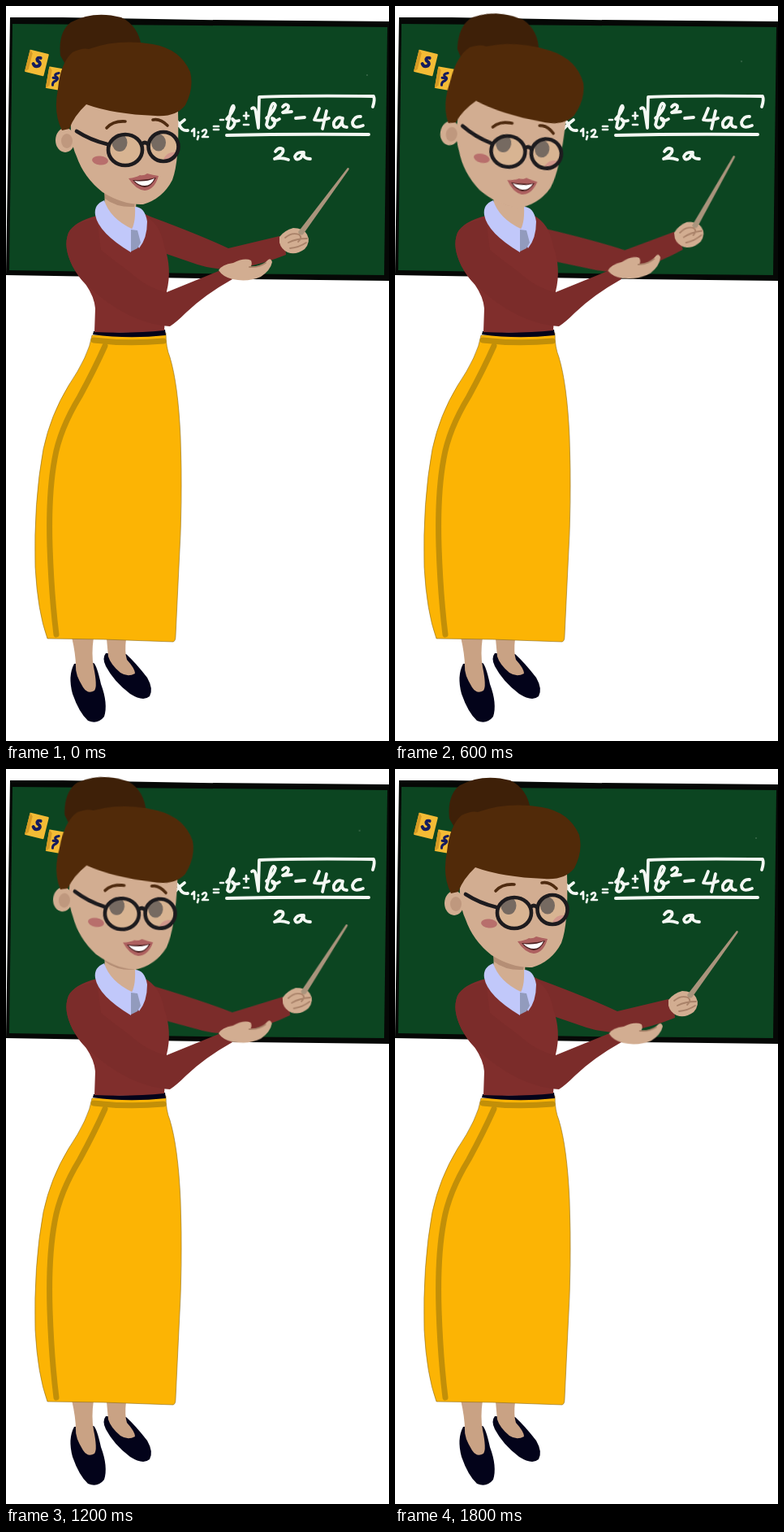
These frames come from a looping animation (472x904 px, 2 s). An HTML page:

```html
<!DOCTYPE html>
<html lang="en">
<head>
<meta charset="utf-8">
<title>Teacher at the board</title>
<style>
  html, body { margin: 0; width: 100%; height: 100%; overflow: hidden; background: #fff; }
  svg { display: block; width: 100%; height: 100%; }

  .skin { fill: #d2ad91; }
  .shade { fill: #b58e75; }
  .leg { fill: #c9a284; }
  .navy { fill: #03031a; }
  .sleeve { fill: #7b2c2a; }
  .hair { fill: #512a09; }
  .collar { fill: #c1c8fa; }
  .line { fill: none; stroke-linecap: round; stroke-linejoin: round; }
  .chalk { stroke: #f4f8f3; stroke-width: 3.8; }
  .small { stroke-width: 2.7; }
  .rim { stroke: #1d1b1e; stroke-width: 4.6; }
  .crease { stroke: #a98269; stroke-width: 1.8; }

  #head, #arm, #hand { animation: 2s step-end infinite; }
  #head { transform-origin: 130px 125px; animation-name: nod; }
  #arm { transform-origin: 298px 224px; animation-name: point; }
  #hand { transform-origin: 268px 326px; animation-name: wave; }

  @keyframes nod {
    0%, 90%, 100% { transform: rotate(0deg); }
    20%, 40%, 60%, 80% { transform: rotate(4.5deg); }
    30%, 70% { transform: rotate(8.2deg); }
    50% { transform: rotate(1.2deg); }
  }
  @keyframes point {
    0%, 90%, 100% { transform: rotate(0deg); }
    20%, 40%, 60%, 80% { transform: rotate(-3.7deg); }
    30%, 70% { transform: rotate(-7deg); }
    50% { transform: rotate(2.4deg); }
  }
  @keyframes wave {
    0%, 100% { transform: none; }
    10%, 90% { transform: translate(1.7px, .5px) rotate(1.1deg); }
    20%, 40%, 60%, 80% { transform: rotate(-1.8deg); }
    30%, 70% { transform: translate(.5px, 0) rotate(-5.5deg); }
    50% { transform: translate(5px, 1.5px) rotate(3.6deg); }
  }
</style>
</head>
<body>
<svg viewBox="0 0 472 904" preserveAspectRatio="none">
  <g id="board">
    <path fill="#060806" d="M5 14L70 14 240 17 472 19V338L300 336 0 331Z"/>
    <path fill="#0c4521" d="M8 22L240 24 470 26 466 331 240 329 4 325Z"/>
  </g>

  <g id="notes">
    <g transform="rotate(14 38 70)">
      <rect x="26" y="56" width="24" height="28" rx="1" fill="#f4bb35"/>
      <path fill="#d69a24" d="M26 56l4 4v20l-4 4Z"/>
      <path class="line" stroke="#141b5e" stroke-width="4" d="M41 63q-5 0-3 4 6 2 3 6-4 3-7-1"/>
    </g>
    <g transform="rotate(10 62 89)">
      <rect x="51" y="76" width="24" height="27" rx="1" fill="#f4bb35"/>
      <path fill="#d69a24" d="M51 76l4 4v19l-4 4Z"/>
      <path class="line" stroke="#141b5e" stroke-width="3" d="M64 82q-6 2-3 5 5 1 1 5-4 2-3 6m-1-9h3"/>
    </g>
  </g>

  <g id="formula" class="line chalk" role="img" aria-label="x 1;2 = (-b ± √(b² − 4ac)) / 2a">
    <path d="M206 140Q211 140 214 147 217 154 224 153M220 140Q213 145 206 153"/>
    <g class="small">
      <path d="M229 154L232 151V160M237 155V156M237 160L236 164M242 154Q246 150 247 154 247 157 242 161L249 161"/>
      <path d="M256 148H262M256 152H262"/>
      <path d="M264 140H268M293 135H299M296 131V139M293 146H299"/>
    </g>
    <path d="M272 139Q280 130 281 125 280 119 277 129L273 149Q276 153 280 148 284 142 279 139 280 143 287 141"/>
    <path d="M303 126Q307 123 308 131L311 150 312 112Q360 110 453 111 455 115 452 124"/>
    <path d="M321 138Q331 129 332 122 329 116 326 126L321 146Q324 153 330 147 334 139 328 138 329 144 337 139"/>
    <path d="M341 124Q345 119 348 123 349 127 341 131L352 130"/>
    <path d="M357 138L368 137"/>
    <path d="M386 126Q383 134 380 140 389 142 398 138M395 129Q392 142 390 151"/>
    <path d="M414 138Q408 135 404 143 403 151 409 149 414 145 415 138 412 149 420 149"/>
    <path d="M437 136Q430 135 427 143 427 152 440 147"/>
    <path stroke-width="4" d="M272 159Q350 157 447 158"/>
    <path d="M332 179Q336 173 341 176 344 181 331 188 340 186 348 189"/>
    <path d="M366 180Q359 179 356 185 357 191 363 187L367 180Q365 188 375 188"/>
  </g>

  <g id="arm">
    <circle cx="445" cy="85" r=".7" fill="#6d8f74"/>
    <path class="sleeve" d="M150 246L178 259Q240 282 274 298L337 283Q345 291 345 306 318 317 286 323 262 326 236 318L160 292Z"/>
    <path class="skin" d="M337 284Q343 276 354 273 366 273 371 281 376 290 368 299 357 307 347 303 339 299 337 291Z"/>
    <path fill="#aa947c" d="M360 278L421 199Q424 199 422 202L366 281Q362 283 360 278Z"/>
    <path class="line crease" d="M344 285Q352 278 361 281 366 285 360 290M348 291Q358 286 371 286M350 298Q361 297 370 291"/>
  </g>

  <g id="legs">
    <path class="navy" d="M84 809Q76 824 82 846 90 869 101 879 113 884 121 874 126 858 117 834 112 811 108 808Z"/>
    <path class="leg" d="M81 776H108Q105 798 108 813 113 837 109 842 101 847 95 838 85 822 86 812 86 798 81 776Z"/>
    <path class="navy" d="M123 796Q118 802 123 812 133 831 153 846 169 856 177 849 182 840 174 826 160 808 148 797Z"/>
    <path class="leg" d="M124 778H148Q146 795 149 804 159 815 159 821 150 826 141 820 129 810 126 800Z"/>
  </g>

  <g id="skirt">
    <path fill="#fcb404" stroke="#8a6a1c" stroke-width=".6" d="M106 405L197 402Q197 420 202 432 212 465 215 530 218 610 213 690L209 775Q209 781 206 782L120 779 51 778Q39 745 36 690 34 610 46 545 55 503 77 467 102 430 106 405Z"/>
    <g class="line" stroke="#c28f08" stroke-width="7">
      <path d="M108 411Q150 416 194 412"/>
      <path d="M122 418Q109 447 91 480 66 521 60 557 52 600 54 665 56 725 62 773"/>
    </g>
    <path class="navy" d="M108 400Q150 403 196 398L197 405Q150 410 107 404Z"/>
  </g>

  <g id="torso">
    <path fill="#802e2c" d="M112 258Q84 265 77 279 70 296 82 320 89 333 98 342 109 358 110 372L109 401Q155 403 195 399L198 351Q205 323 195 295 190 267 170 257Z"/>
    <path class="sleeve" d="M112 262Q84 265 77 279 70 296 82 320 89 333 98 342 150 391 202 394 210 389 222 377 245 355 279 336L274 323 262 326 198 352Q174 347 151 326 129 310 117 300Z"/>
    <path class="skin" d="M122 228L160 238 161 262 154 277Q132 266 121 250Z"/>
    <path class="shade" d="M121 230L160 238 158 247Q136 248 122 237Z"/>
    <path class="collar" d="M121 239Q108 244 110 257 114 279 154 303L155 274Q128 261 121 239Z"/>
    <path class="collar" d="M159 247Q171 247 174 265 174 286 164 298L153 277Q160 269 159 247Z"/>
    <path fill="#929bbd" d="M154 275L162 276 166 291 162 298 154 302Z"/>
  </g>

  <g id="head">
    <path fill="#3e2008" d="M67 61Q64 32 80 20 108 5 142 14 163 24 167 50L150 75 75 75Z"/>
    <path class="skin" d="M85 120Q76 142 82 163 81 172 87 185 96 211 119 229 145 245 169 244 193 237 205 214 214 190 212 130L150 115Z"/>
    <ellipse class="skin" cx="73" cy="165" rx="12" ry="15"/>
    <ellipse class="shade" cx="75" cy="166" rx="7" ry="9" opacity=".65"/>
    <path class="hair" d="M69 153Q58 132 64 102 67 70 82 57 94 51 102 53 138 40 181 47 215 53 227 81 232 101 221 122 209 137 184 135 132 133 99 121 84 135 78 151Z"/>
    <g class="line" stroke="#4f2b10" stroke-width="3.6">
      <path d="M124 150Q132 141 147 142M181 140Q190 138 199 147"/>
    </g>
    <ellipse cx="116" cy="190" rx="10" ry="5.5" fill="#b86f6c" transform="rotate(6 116 190)"/>
    <path fill="#c98888" d="M194 188Q199 178 212 180L209 188Q200 194 194 188Z"/>
    <g fill="#f4cf98" fill-opacity=".18">
      <ellipse cx="147" cy="177" rx="21" ry="19"/>
      <ellipse cx="194" cy="173" rx="18.5" ry="18"/>
    </g>
    <g fill="#766a61">
      <ellipse cx="140" cy="168" rx="9.5" ry="11"/>
      <ellipse cx="188" cy="168" rx="9" ry="10.5"/>
    </g>
    <g class="line rim">
      <ellipse cx="147" cy="177" rx="21" ry="19"/>
      <ellipse cx="194" cy="173" rx="18.5" ry="18"/>
      <path d="M87 154Q104 165 125 170M167 170Q171 166 175 170"/>
    </g>
    <path fill="#ad605f" d="M151 212Q160 211 165 208 170 209 174 206 181 208 188 209 183 226 171 227 160 226 151 212Z"/>
    <path fill="#4a2020" d="M156 214Q171 215 185 211 179 223 171 223 162 222 156 214Z"/>
    <path fill="#fff" d="M158 215Q172 217 183 212 179 221 171 221 164 221 158 215Z"/>
  </g>

  <g id="hand">
    <path class="skin" d="M262 325Q266 318 280 316 294 309 302 313 304 318 301 321 315 321 321 314 326 308 328 315 326 325 314 333 298 340 279 336 267 333 262 325Z"/>
    <path class="line crease" d="M300 321Q311 322 320 316"/>
  </g>
</svg>
</body>
</html>
```
